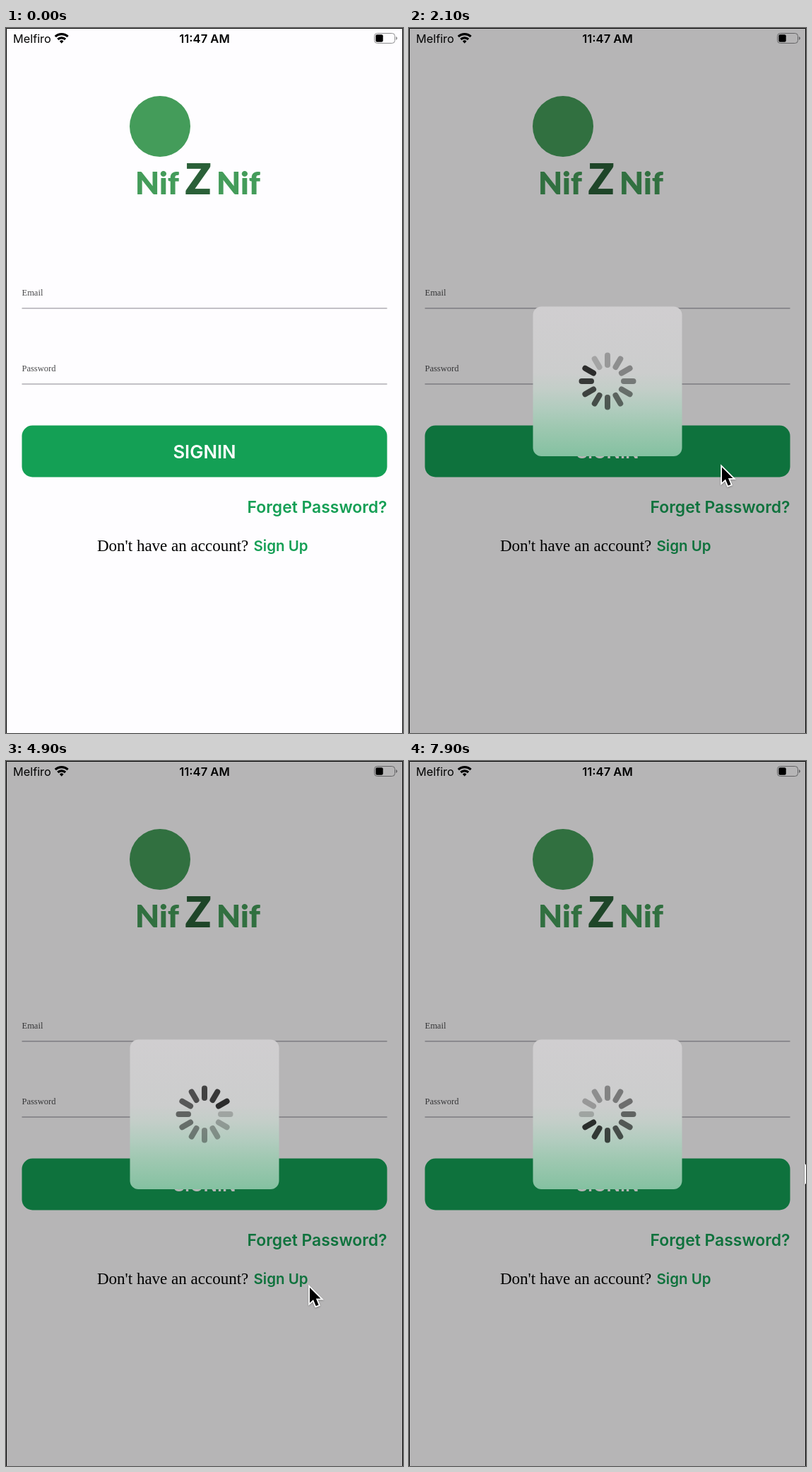
Write an HTML page that moves like this. It is 562 px wide and 996 px high and loops after 8 s.

```html
<!DOCTYPE html>
<html lang="en">
<head>
<meta charset="utf-8">
<title>Sign in</title>
<style>
  html, body { margin: 0; width: 100%; height: 100%; overflow: hidden; background: #fefdff; }
  svg { display: block; width: 562px; height: 996px; }
  .sans { font-family: Inter, Roboto, sans-serif; }
  .serif { font-family: "Liberation Serif", "Noto Serif", serif; }
  .brand { font-family: Lato, "Open Sans", sans-serif; font-weight: 900; }
  .semi { font-weight: 600; }
</style>
</head>
<body>
<svg viewBox="0 0 562 996">
  <defs>
    <linearGradient id="frost" x1="0" y1="0" x2="0" y2="1">
      <stop offset="0" stop-color="#d0ced0"/>
      <stop offset=".44" stop-color="#cccdcd"/>
      <stop offset=".55" stop-color="#c3cec8"/>
      <stop offset=".68" stop-color="#b1ccbe"/>
      <stop offset=".8" stop-color="#9fc8b1"/>
      <stop offset="1" stop-color="#84c1a1"/>
    </linearGradient>
  </defs>

  <rect width="562" height="996" fill="#fefdff"/>

  <!-- status bar -->
  <g class="sans" font-size="16.3">
    <text x="10" y="21">Melfiro</text>
    <text class="semi" x="281" y="21" font-size="16.6" text-anchor="middle">11:47 AM</text>
  </g>
  <g fill="none" stroke="#000" stroke-width="3.2">
    <path d="M69.8 12.2a12.8 12.8 0 0 1 17.8 0"/>
    <path d="M73.3 16a7.8 7.8 0 0 1 10.8 0"/>
  </g>
  <path d="M75.9 18.7a4 4 0 0 1 5.6 0L78.7 21.8z"/>
  <rect x="521.5" y="7.5" width="29" height="14" rx="4" fill="none" stroke="#8c8c8e"/>
  <path d="M552 12a2.6 2.6 0 0 1 0 5z" fill="#8c8c8e"/>
  <rect x="523.3" y="9.3" width="10.4" height="10.4" rx="2"/>

  <!-- brand -->
  <circle cx="218" cy="139" r="43" fill="#449c5a"/>
  <g class="brand" font-size="44" fill="#449c5a">
    <text x="183" y="235">Nif</text>
    <text x="298" y="235">Nif</text>
    <text x="272" y="235" font-size="61" fill="#2a6038" text-anchor="middle">Z</text>
  </g>

  <!-- form -->
  <g class="serif" font-size="12.5" fill="#4c4c4e">
    <text x="22.5" y="378">Email</text>
    <text x="22.5" y="485">Password</text>
  </g>
  <path d="M22.5 396H539.5M22.5 503H539.5" stroke="#b0afb4" stroke-width="1.3"/>
  <rect x="22.5" y="561.5" width="517" height="73" rx="15" fill="#14a055"/>
  <g class="sans semi" fill="#159f55">
    <text x="281" y="607.5" font-size="25.7" fill="#fff" text-anchor="middle">SIGNIN</text>
    <text x="539.5" y="685" font-size="22.9" text-anchor="end">Forget Password?</text>
    <text x="350.5" y="738.5" font-size="20.5">Sign Up</text>
  </g>
  <text class="serif" x="129" y="739" font-size="23">Don't have an account?</text>

  <rect id="dim" width="562" height="996" opacity="0"/>
  <g id="loader" opacity="0">
    <rect id="panel" x="175.5" y="393.5" width="211" height="211.5" rx="12" fill="url(#frost)"/>
    <g id="spinner" transform="translate(281 499)" stroke="#000" stroke-width="8" stroke-linecap="round"/>
  </g>

  <path d="M.5 996V.5H561.5V996" fill="none" stroke="#000"/>
  <path id="cursor" d="M0 0V21.5L5 17L8.7 26L12.6 24.4L8.9 15.5H15.5Z"
        stroke="#fff" stroke-width="3.6" paint-order="stroke"
        style="filter:drop-shadow(0 1px 1px rgba(0,0,0,.3))"/>
</svg>
<script>
const LOOP = 8000, STEP = 100, SPOKES = 12;
const $ = id => document.getElementById(id);

// Rows: time, dim, loader opacity, panel brightness
const FADE = [[1000, 0, 0, 1.08], [1100, .13, .55, 1.07],
  [1200, .232, 1, 1.05], [1300, .288, 1, 1]];
// Rows: time, x, y
const POINTER = [[0, 580, 720], [100, 562, 706], [800, 443, 620.5],
  [2700, 443, 620.5], [3100, 430, 744], [5500, 430, 744], [6000, 562, 573]];

const spokes = Array.from({ length: SPOKES }, (_, i) => {
  const line = document.createElementNS("http://www.w3.org/2000/svg", "path");
  line.setAttribute("d", "M0-23V-36.5");
  line.setAttribute("transform", `rotate(${i * 360 / SPOKES})`);
  $("spinner").append(line);
  return line;
});

function sample(rows, t) {
  const next = rows.findIndex(row => row[0] > t);
  if (next === 0) return rows[0].slice(1);
  if (next < 0) return rows[rows.length - 1].slice(1);
  const a = rows[next - 1], b = rows[next];
  const k = (t - a[0]) / (b[0] - a[0]);
  const eased = k * k * (3 - 2 * k);
  return a.slice(1).map((v, i) => v + (b[i + 1] - v) * eased);
}

function draw(now) {
  const tick = Math.floor((now % LOOP) / STEP);
  const t = tick * STEP;
  const [dim, shown, glow] = sample(FADE, t);
  const [x, y] = sample(POINTER, t);
  $("dim").setAttribute("opacity", dim);
  $("loader").setAttribute("opacity", shown);
  $("panel").style.filter = glow === 1 ? "none" : `brightness(${glow})`;
  $("cursor").setAttribute("transform", `translate(${x} ${y})`);

  const head = (tick + 1) % SPOKES;
  spokes.forEach((line, i) => {
    const age = (head - i + SPOKES) % SPOKES;
    line.setAttribute("opacity", .78 - age * .053);
  });
}

function loop() {
  draw(performance.now());
  requestAnimationFrame(loop);
}
loop();
</script>
</body>
</html>
```
